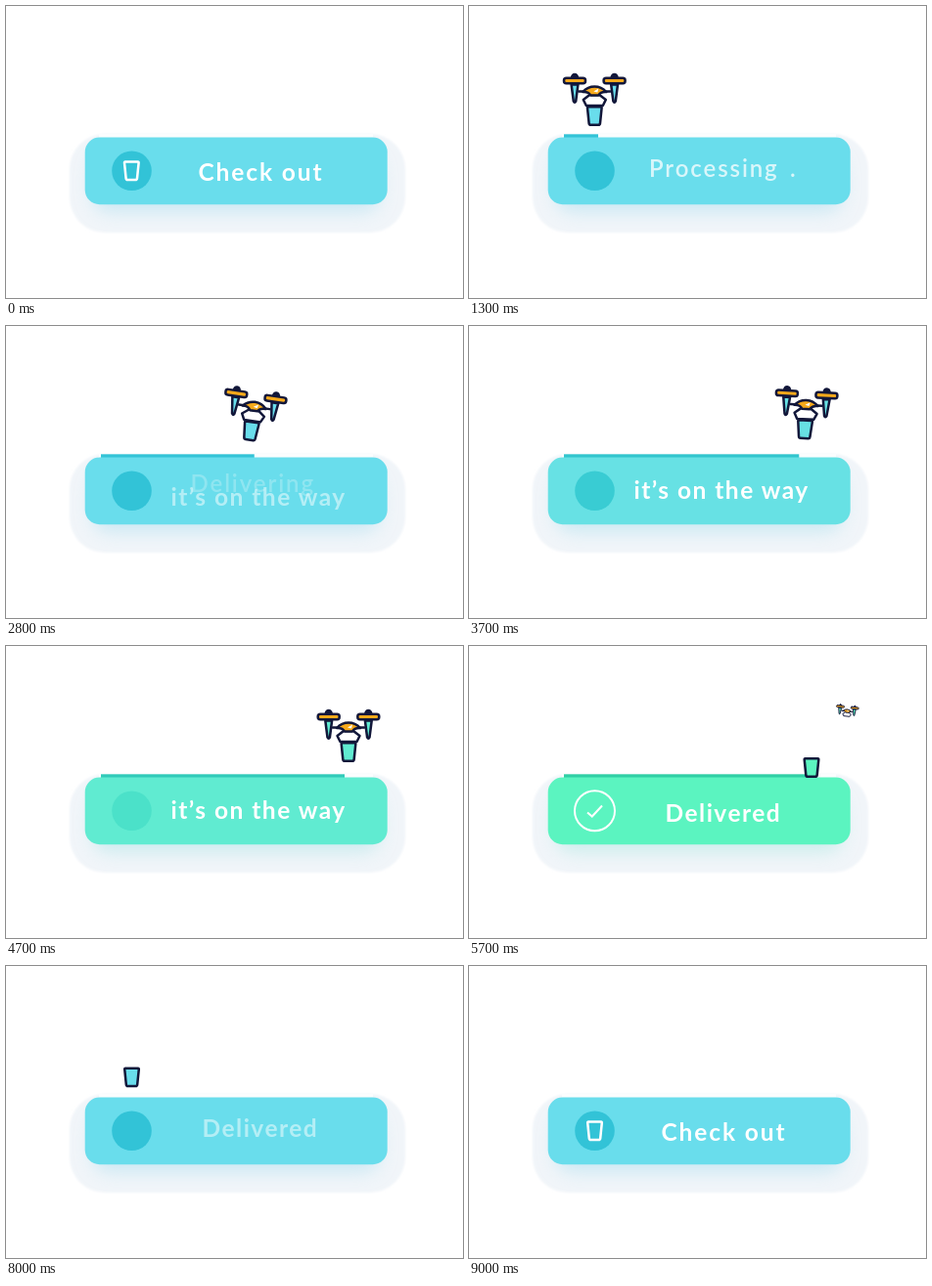
Animation, 467 px wide and 299 px high, one loop 10000 ms. Source, as an HTML page:

```html
<!DOCTYPE html>
<html lang="en">
<head>
<meta charset="utf-8">
<title>Check out button</title>
<style>
  html, body { margin: 0; width: 100%; height: 100%; overflow: hidden; background: #fff; }
  svg { display: block; width: 467px; height: 299px; }
  text { font: 700 24.5px Lato, "Open Sans", sans-serif; letter-spacing: 1.5px; fill: #fff; }
  .soft { font-weight: 600; font-size: 24px; letter-spacing: 1.9px; }
  .wide { letter-spacing: 1.9px; }
  .ink { stroke: #12173a; stroke-width: 2.5; stroke-linejoin: round; stroke-linecap: round; }
</style>
</head>
<body>
<svg viewBox="0 0 467 299">
  <defs>
    <filter id="edge" x="-10%" y="-30%" width="120%" height="160%"><feGaussianBlur stdDeviation="1.2"/></filter>
    <filter id="glow" x="-20%" y="-60%" width="140%" height="220%"><feGaussianBlur stdDeviation="9"/></filter>
    <g id="rotor">
      <path class="ink" d="M-3.4 4 H3.4 L1.200 21 Q0 23.500 -1.200 21 Z" fill="var(--main)"/>
      <path class="ink" d="M-3 -3 Q-2.500 -6.500 0 -6.500 Q2.500 -6.500 3 -3 Z" fill="#12173a"/>
      <rect class="ink" x="-11" y="-2.800" width="22" height="5.600" rx="2.500" fill="#f6a91b"/>
    </g>
  </defs>

  <rect x="65" y="131" width="343" height="101" rx="36" fill="#f1f5f9" filter="url(#edge)"/>
  <rect id="shadow" x="88" y="153" width="294" height="58" rx="18" opacity=".5" filter="url(#glow)"/>
  <rect x="95" y="131" width="280" height="5" fill="#fbfdfe"/>
  <rect id="bar" x="97" y="131.300" height="4"/>
  <rect id="button" x="80.700" y="134.600" width="309" height="68.600" rx="15"/>
  <circle id="disc" cx="128.500" cy="168.800" r="20.300"/>
  <g fill="none" stroke="#fff" stroke-width="2">
    <circle id="ring" cx="128.500" cy="168.800" r="20.500" pathLength="1" transform="rotate(-90 128.500 168.800)"/>
    <path id="tick" d="M121 170.500 L125.800 174.500 L136 163.500" pathLength="1"/>
  </g>

  <g id="labels">
    <text x="196.500" y="179" class="wide">Check out</text>
    <text x="184" y="177" class="soft">Processing<tspan class="dot" x="328">.</tspan></text>
    <text x="188.500" y="177" class="soft">Delivering<tspan class="dot" x="326">.</tspan></text>
    <text x="168.500" y="177">it’s on the way</text>
    <text x="200.500" y="179.500">Delivered</text>
  </g>

  <g id="drone">
    <use href="#rotor" x="-20.300" y="-36"/>
    <use href="#rotor" x="20.300" y="-36"/>
    <path class="ink" d="M-16 -25 H16" fill="none"/>
    <path class="ink" d="M-5 -21.500 L-11.500 -16.500 L-8.500 -10.500 H8.500 L11.500 -16.500 L5 -21.500 Z" fill="#fff"/>
    <path class="ink" d="M-12 -24.500 Q-7 -30 0 -30 Q7 -30 12 -24.500 Q6 -25 4 -21 H-4 Q-6 -25 -12 -24.500 Z" fill="#f6a91b"/>
    <path d="M-1 -25 L4 -28 L3 -24 Z" fill="#fff"/>
  </g>
  <path id="cup" d="M-6.500 -9.200 H6.500 Q7.400 -9.200 7.300 -8.200 L5.700 7.500 Q5.500 9.200 4 9.200 H-4 Q-5.500 9.200 -5.700 7.500 L-7.300 -8.200 Q-7.400 -9.200 -6.500 -9.200 Z"
        stroke-width="2.500" stroke-linejoin="round"/>
</svg>

<script>
const LOOP = 10000, LAST = 9000, STEP = 100;
const $ = id => document.getElementById(id);
const clamp = v => Math.min(1, Math.max(0, v));

const linear = p => p;
const easeIn = p => p * p;
const easeOut = p => 1 - (1 - p) ** 2;
const easeInOut = p => p < .5 ? 2 * p * p : 1 - 2 * (1 - p) ** 2;

// Keys are [time, value, easing towards this key].
function track(t, keys) {
  if (t <= keys[0][0]) return keys[0][1];
  for (let i = 1; i < keys.length; i++) {
    const [t0, v0] = keys[i - 1], [t1, v1, ease = linear] = keys[i];
    if (t <= t1) return v0 + (v1 - v0) * ease((t - t0) / (t1 - t0));
  }
  return keys[keys.length - 1][1];
}

const mix = (a, b, p) => `rgb(${a.map((v, i) => Math.round(v + (b[i] - v) * p))})`;
const INK = [18, 23, 58], WHITE = [255, 255, 255];
const PALETTE = {
  main: [[105, 221, 236], [91, 244, 192]],
  disc: [[50, 195, 215], [91, 244, 192]],
  bar: [[50, 195, 215], [47, 207, 165]],
  shadow: [[166, 220, 238], [166, 230, 224]],
};

const KEYS = {
  green: [[3300, 0], [5600, 1], [5900, 1], [7450, 0]],
  cupX: [[1450, 128.3], [4020, 350, easeInOut], [6000, 350], [7280, 128.5, easeInOut]],
  cupY: [[0, 168.8], [200, 171, easeOut], [700, 94.5, easeOut], [1100, 124, easeIn],
    [1300, 112.5, easeInOut], [1700, 105, easeOut], [2200, 106.5, easeInOut],
    [2800, 107.5, easeInOut], [3500, 105.5, easeInOut], [4300, 108.5, easeInOut], [4750, 108.5],
    [5050, 124.5, easeInOut], [7400, 124.5], [7750, 94.5, easeOut], [8250, 172, easeIn],
    [8500, 166.5, easeInOut], [8750, 169.8, easeInOut], [9000, 168.8, easeInOut]],
  bar: [[900, 97], [1300, 132], [4100, 346, easeInOut], [4750, 346], [5050, 350]],
  barEnd: [[7400, 128.5], [7750, 97]],
  grow: [[900, 0], [1300, 1, easeOut]],
  leave: [[5050, 0], [5950, 1]],
  ringStart: [[6900, 0], [7400, 1]],
  ringEnd: [[4900, 0], [5500, 1]],
  tickStart: [[7300, 0], [7600, 1]],
  tickEnd: [[5300, 0], [5600, 1]],
};

// Label times: [enter start, enter end, exit start, exit end].
const LABEL_TIMES = [
  [8000, 8500, 50, 500],
  [350, 800, 1150, 1750],
  [1350, 1800, 2350, 2950],
  [2500, 3100, 4850, 5300],
  [5050, 5500, 7750, 8250],
];
const labels = [...$('labels').children];
const dots = document.querySelectorAll('.dot');

function drawLabels(t) {
  labels.forEach((label, i) => {
    const [in0, in1, out0, out1] = LABEL_TIMES[i];
    const enter = clamp((t - in0) / (in1 - in0));
    const exit = clamp((t - out0) / (out1 - out0));
    const entering = i === 0 ? t >= out1 : t < in1;
    label.setAttribute('opacity', entering ? enter : 1 - exit);
    label.setAttribute('transform', `translate(0 ${entering ? 14 * (1 - enter) : -10 * exit})`);
  });
  const dotOn = Math.floor(t / 300) % 2 === 0;
  dots.forEach(dot => dot.setAttribute('fill-opacity', +dotOn));
}

function drawStroke(id, from, to) {
  const visible = to > from;
  $(id).setAttribute('visibility', visible ? 'visible' : 'hidden');
  if (visible) $(id).setAttribute('stroke-dasharray', `0 ${from} ${to - from} 2`);
}

function draw(t) {
  const at = name => track(t, KEYS[name]);
  const green = at('green');
  const color = name => mix(...PALETTE[name], green);
  document.documentElement.style.setProperty('--main', color('main'));
  $('button').setAttribute('fill', color('main'));
  for (const id of ['disc', 'bar', 'shadow']) $(id).setAttribute('fill', color(id));

  const x = at('cupX'), y = at('cupY');
  const end = t < 6000 ? at('bar') : t < 7400 ? x : at('barEnd');
  $('bar').setAttribute('width', Math.max(0, end - 97));

  const tilt = 8.5 * Math.sin(Math.PI * clamp((t - 1450) / 2570));
  const inside = clamp((y - 126) / 24);
  $('cup').setAttribute('transform', `translate(${x} ${y}) rotate(${tilt})`);
  $('cup').setAttribute('stroke', mix(INK, WHITE, inside));
  $('cup').setAttribute('fill', color('main'));
  $('cup').setAttribute('fill-opacity', 1 - inside);

  const leave = at('leave');
  const scale = at('grow') * (1 - .88 * leave);
  const shown = t > 900 && t < 5950;
  const droneX = x + 49 * leave, droneY = y - 67.5 * leave;
  $('drone').setAttribute('visibility', shown ? 'visible' : 'hidden');
  $('drone').setAttribute('transform',
    `translate(${droneX} ${droneY}) rotate(${tilt + 9 * leave}) scale(${scale})`);

  drawStroke('ring', at('ringStart'), at('ringEnd'));
  drawStroke('tick', at('tickStart'), at('tickEnd'));
  drawLabels(t);
}

const start = performance.now();
function frame() {
  const elapsed = (performance.now() - start) % LOOP;
  draw(Math.min(LAST, Math.floor(elapsed / STEP) * STEP));
  requestAnimationFrame(frame);
}
frame();
</script>
</body>
</html>
```
